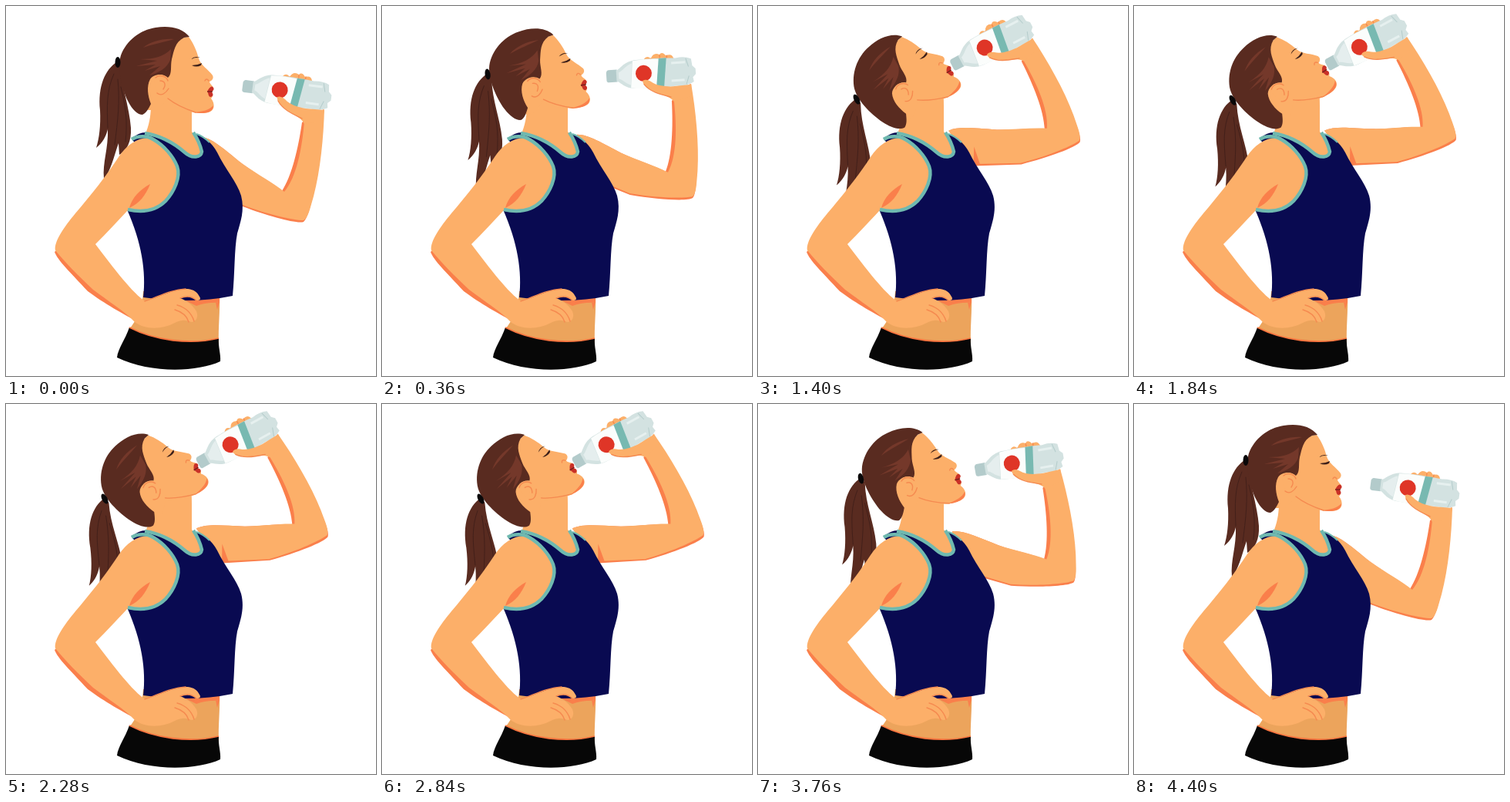
An HTML page that plays this animation: 480x480 px, repeating every 4440 ms.

```html
<!DOCTYPE html>
<html lang="en">
<head>
<meta charset="utf-8">
<title>Drinking water</title>
<style>
  html, body { margin: 0; width: 100%; height: 100%; overflow: hidden; background: #fff; }
  svg { display: block; width: 100vw; height: 100vh; }
  .skin { fill: #fcaf69; }
  .shade { fill: #fa7f4b; }
  .line { fill: none; stroke: #f58a50; stroke-width: 1.4; stroke-linecap: round; }
  .hair { fill: #592b20; }
  .shine { fill: #74382a; }
  .strand { fill: none; stroke: #43201a; stroke-width: 1; stroke-linecap: round; }
  .ink { fill: #3c1f19; }
  .navy { fill: #090a51; }
  .trim { fill: none; stroke: #6fb9b0; stroke-width: 4.5; stroke-linejoin: round; }
</style>
</head>
<body>
<svg viewBox="0 0 480 480">
  <g id="tail">
    <path class="hair" d="M145 72C128 82 119 105 122 135C123 155 121 172 117 184C126 177 130 168 132 160C133 185 125 203 127 224C136 214 139 198 146 178L147 193C157 188 163 175 162 158C160 130 150 108 150 78Z"/>
    <path class="strand" d="M140 88C130 110 131 130 132 158M145 95C148 125 145 148 141 180M149 105C155 130 158 148 155 176"/>
  </g>

  <!-- neck and upper chest -->
  <path class="skin" d="M190 112H240Q241 118 241 130L241 163L258 185L250 200H232L176 172L182 163C187 150 188 138 188 128Z"/>

  <g id="head">
    <path class="skin" d="M237 40C243 48 247 57 250 68C252 76 263 83 268 90C270 94 267 97 264 98C264 101 268 103 269 106C270 109 267 110 267 112C269 115 268 118 266 120C271 126 271 134 265 137C259 140 249 139 243 138C228 134 215 128 209 122L196 135L184 135L180 80L210 45Z"/>
    <path class="shade" d="M243 138C254 140 269 140 269 129C264 135 255 137 243 138Z"/>
    <path class="line" d="M210 120C220 128 231 133 246 138"/>
    <path class="hair" d="M238 40C229 28 211 25 194 28C174 31 156 45 149 64C144 80 150 106 158 123C164 135 171 141 177 141C182 139 185 133 188 127C184 117 182 104 187 95C192 88 204 87 210 93C216 88 213 78 215 69C218 58 219 47 231 41Z"/>
    <path class="shine" d="M214 56C204 66 192 69 174 69L196 71L169 78L194 76L180 84L200 78L186 90C200 86 209 80 213 70ZM218 43C202 42 188 46 178 54C192 49 204 47 218 43Z"/>
    <path class="skin" d="M193 100C190 91 198 86 206 91C214 95 212 105 206 111C202 117 195 116 193 100Z"/>
    <path class="line" d="M194 93C199 88 208 91 210 97M200 97C206 97 208 102 204 108M196 113C202 118 208 112 211 107"/>
    <path class="ink" d="M240 69Q245 64 252 67Q246 66 240 69ZM241 77Q248 77 254 74L253 77Q247 80 241 77Z"/>
    <path class="line" d="M258 97Q260 93 263 97"/>
    <path d="M261 111C264 105 267 103 269 106C271 109 267 110 267 112C270 115 268 118 265 118C262 117 263 113 261 111Z" fill="#c93128"/>
    <path d="M261 111L268 111" stroke="#74201d" stroke-width="1.3"/>
  </g>
  <ellipse id="band" cx="145" cy="73" rx="3.5" ry="7" fill="#0a0809"/>

  <g id="arm">
    <!-- fingers behind the bottle -->
    <path class="skin" d="M353 104L359 91Q364 86 368 92Q373 84 380 89Q384 85 388 92Q396 90 397 97L399 112Z"/>
    <path class="line" d="M368 92L366 97M380 90L379 97M389 92L388 98"/>
    <path class="shade" d="M255 170C270 173 284 187 307 205C327 220 346 229 358 240C371 220 379 185 384 151L412 134C411 170 407 215 398 248C394 262 391 276 386 280C378 283 341 273 307 260L255 226Z"/>
    <path class="skin" d="M255 170C270 173 284 187 307 205C327 219 346 229 361 241C377 222 384 185 387 150L413 134C412 170 408 213 399 247C394 264 392 275 386 278C372 278 338 270 307 258L255 223Z"/>
    <path class="shade" d="M270 206L255 226L263 230Z"/>
    <g transform="translate(363.5 111) rotate(7.5)">
      <path d="M-57 -5Q-56 -8 -54 -8H-43V8H-54Q-57 8 -57 5Z" fill="#b3cbcb"/>
      <path d="M-44 -7C-39 -8 -35 -17 -20 -19C8 -20 24 -19 34 -18Q45 -20 54 -16L55 -7L59 -3V4L55 8L56 14Q46 20 34 18C18 19 0 19 -20 18C-35 17 -39 8 -44 7Z" fill="#d3e2e1"/>
      <path d="M-41 -4C-35 -6 -32 -12 -23 -15L-26 13C-34 10 -36 5 -41 4Z" fill="#e5eeee"/>
      <path d="M-22 -18Q-5 -20 13 -18L8 18Q-8 20 -26 17Z" fill="#fbfdfc"/>
      <path d="M12 -19H22L17 18H7Z" fill="#78b9b1"/>
      <path d="M28 -12H46M27 11H44" fill="none" stroke="#e6f0ef" stroke-width="3"/>
      <path d="M47 -17L50 -6M46 17L50 6" fill="none" stroke="#b4cccb"/>
      <circle cx="-8.5" cy="-1" r="10.5" fill="#df3527"/>
    </g>
    <!-- thumb and palm -->
    <path class="skin" d="M352 118Q357 116 362 121C368 128 378 131 389 133L413 135L410 150L387 153C382 143 371 141 362 133C356 128 351 123 352 118Z"/>
    <path class="line" d="M353 123C359 135 374 141 384 146"/>
  </g>

  <!-- waist and shorts -->
  <path d="M178 370H277C278 398 275 416 276 438Q215 444 160 419C169 408 177 393 178 370Z" fill="#eca45c"/>
  <path class="shade" d="M224 378H277V385Q262 384 247 389ZM272 384H277L274 394Z"/>
  <path d="M160 417C193 434 239 440 276 431C275 442 279 452 278 461C248 475 187 477 144 456C145 445 155 432 160 417Z" fill="#070707"/>
  <path d="M160 417C193 434 239 440 276 431" fill="none" stroke="#f9743f" stroke-width="1.8"/>

  <!-- tank top -->
  <path class="navy" d="M163 172Q172 164 181 164C200 167 218 177 233 189C242 198 253 194 255 188L244 165C256 168 267 177 274 190C284 211 300 229 305 246C310 265 304 281 300 295C296 316 297 346 294 376Q242 387 178 378C182 345 176 307 157 264L190 210Z"/>
  <path class="trim" d="M180 165C200 168 217 177 232 190C242 199 253 196 254 189Q251 176 243 164" stroke-width="4"/>
  <path d="M247 166Q256 169 264 177" fill="none" stroke="#6fb9b0" stroke-width="2"/>

  <!-- near arm -->
  <path class="shade" d="M63 319C67 330 83 345 106 370C129 387 148 397 180 415L190 395L80 305Z"/>
  <path class="skin" d="M185 171C169 171 156 181 146 196C132 218 108 248 90 269C75 287 62 306 64 317C76 332 94 350 113 368C134 384 154 396 167 410C180 420 202 420 219 411C229 406 235 408 240 410C247 410 250 403 247 396C242 388 236 383 226 379C236 375 243 378 247 382C252 382 253 380 251 377C248 371 244 368 236 367C220 366 198 377 181 383C165 374 139 339 116 309C130 295 145 279 158 265C177 270 198 263 210 249C224 232 226 216 218 203C209 187 198 174 185 171Z"/>
  <path class="shade" d="M160 262C163 249 174 238 187 231C181 246 173 256 160 262Z"/>
  <path class="line" d="M226 379C236 375 243 378 247 382M180 383C198 377 213 368 233 367M222 388C233 391 241 399 244 409M219 394C229 397 235 403 237 410"/>
  <path class="trim" d="M163 173C171 168 183 168 191 173C205 181 217 195 222 208C227 222 218 241 207 253C194 266 176 268 158 264"/>
</svg>
<script>
  const LOOP = 4440, STEP = 40;
  const RISE_END = 960, SIP_START = 1160, SIP = 560, LOWER_START = 3120, LOWER_END = 4360;
  const part = id => document.getElementById(id);
  const head = part('head'), tail = part('tail'), band = part('band'), arm = part('arm');

  const ease = x => (1 - Math.cos(Math.PI * Math.min(1, Math.max(0, x)))) / 2;
  const sipAt = t => t < SIP_START || t > SIP_START + 3 * SIP
    ? 0 : (1 - Math.cos(2 * Math.PI * (t - SIP_START) / SIP)) / 2;

  function draw(t) {
    const sip = sipAt(t);
    const lift = ease(t / RISE_END) - ease((t - LOWER_START) / (LOWER_END - LOWER_START));
    const p = lift - 0.04 * sip;
    const dx = -17 * Math.sin(p * Math.PI / 2), dy = 50 * p;

    arm.setAttribute('transform', `rotate(${-36.5 * p} 238 178)`);
    head.setAttribute('transform', `translate(${-12 * p} ${10 * p}) rotate(${-34 * p} 201 102)`);
    tail.setAttribute('transform', `translate(${dx} ${dy}) rotate(${-4 * p + 3 * sip} 145 73)`);
    band.setAttribute('transform', `translate(${dx} ${dy}) rotate(${-28 * p} 145 73)`);
  }

  const start = performance.now();
  function tick() {
    const t = (performance.now() - start) % LOOP;
    draw(Math.floor(t / STEP) * STEP);
    requestAnimationFrame(tick);
  }
  tick();
</script>
</body>
</html>
```
